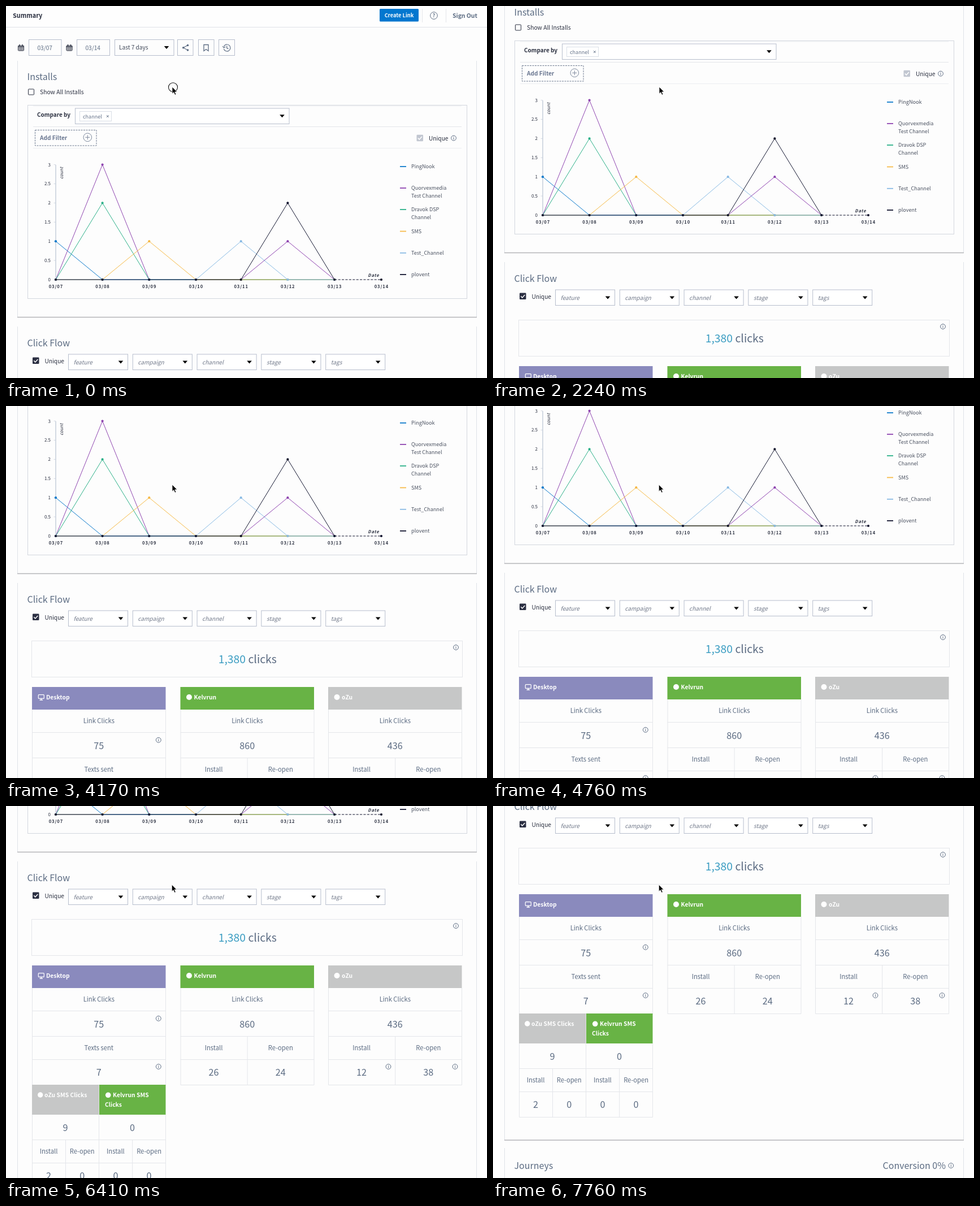
An HTML page for the animation above (8000 ms loop, 851 by 658 pixels).

```html
<!DOCTYPE html>
<html lang="en">
<head>
<meta charset="utf-8">
<title>Summary</title>
<style>
html, body { margin: 0; width: 100%; height: 100%; overflow: hidden; background: #fdfdfd; }
svg { display: block; width: 100vw; height: 100vh; font-family: "Noto Sans CJK JP", "Noto Sans CJK SC", "Noto Sans CJK", "Open Sans", sans-serif; }
text { white-space: pre; }
</style>
</head>
<body>
<svg id="stage" viewBox="0 0 851 658">
  <g id="page"></g>
  <circle id="ripple" cx="295.5" cy="143.7" r="8" fill="none" stroke="#111" stroke-width="1.1"/>
  <path id="cursor" d="M0 0V12.2L2.8 9.7 4.9 14.3 7 13.4 4.9 8.9H8.8Z" fill="#000" stroke="#fff" stroke-width=".8"/>
</svg>
<script>
const INK = '#2b3040', SLATE = '#5b6b82', EDGE = '#b7becd', HAIR = '#e4e6ea';
const VIOLET = '#8a8abd', GREEN = '#68b345', GREY = '#c6c7c7';
const $ = id => document.getElementById(id);
let out = '';
const add = s => { out += s; };

// y is the middle of the capital letters
function text(x, y, s, size, color = INK, extra = '') {
  add(`<text x="${x}" y="${(y + size * 0.366).toFixed(2)}" font-size="${size}" fill="${color}" ${extra}>${s}</text>`);
}
const MID = 'text-anchor="middle" ', END = 'text-anchor="end" ', BOLD = 'font-weight="700" ';
const LIGHT = 'font-weight="300" ', ITALIC = 'font-style="italic" ', MEDIUM = 'font-weight="500" ';

const box = (x, y, w, h, stroke = EDGE, fill = 'none', extra = '') =>
  add(`<rect x="${x}" y="${y}" width="${w}" height="${h}" stroke="${stroke}" fill="${fill}" ${extra}/>`);
const fill = (x, y, w, h, color, extra = '') => box(x, y, w, h, 'none', color, extra);
const path = (d, stroke, width = 1, extra = '') =>
  add(`<path d="${d}" fill="none" stroke="${stroke}" stroke-width="${width}" ${extra}/>`);
const line = (x1, y1, x2, y2, color = HAIR, width = 1, extra = '') =>
  path(`M${x1} ${y1}L${x2} ${y2}`, color, width, extra);
const dot = (x, y, r, color) => add(`<circle cx="${x}" cy="${y}" r="${r}" fill="${color}"/>`);
const ring = (x, y, r, color = SLATE) =>
  add(`<circle cx="${x}" cy="${y}" r="${r}" fill="none" stroke="${color}"/>`);
const caret = (x, y) => add(`<path d="M${x - 4.3} ${y - 2.4}h8.6l-4.3 5z" fill="#000"/>`);

function info(x, y) {
  ring(x, y, 4.4);
  path(`M${x} ${y - 2.4}v1.2M${x} ${y - .5}v2.9`, SLATE);
}
function check(x, y, color) {
  fill(x, y, 11.5, 11.5, color, 'rx="1.3"');
  path(`M${x + 2.3} ${y + 5.8}l2.5 2.6 4.5-5`, '#fff', 1.5);
}
function calendar(x, y) {
  box(x + .5, y + 2, 10, 9, INK, 'none', 'rx="1"');
  path(`M${x + 3} ${y}v3M${x + 8} ${y}v3M${x} ${y + 4}h11`, INK, 1.4);
  path(`M${x} ${y + 6.5}h11M${x} ${y + 9}h11M${x + 3.3} ${y + 4}v7M${x + 5.7} ${y + 4}v7M${x + 8} ${y + 4}v7`, INK, .7);
}
function panel(top, bottom) {
  path(`M20.5 ${top}V${bottom}M832.5 ${top}V${bottom}`, '#dfe2e8');
  line(20, bottom + .5, 833, bottom + .5, '#b4b5b8', 1.3);
}

function header() {
  fill(0, 0, 851, 37, '#fefefe');
  line(0, 37.5, 851, 37.5, '#dfe2e8');
  text(12, 17, 'Summary', 10.9, INK, BOLD);
  fill(661, 5, 69, 22.5, '#0277cf', 'rx="1.5"');
  text(695.5, 16.3, 'Create Link', 9.3, '#fff', BOLD + MID);
  line(736.5, 5, 736.5, 29);
  line(778.5, 5, 778.5, 29);
  ring(757, 17, 6.3);
  text(757, 17.2, '?', 8.5, SLATE, BOLD + MID);
  text(790, 17, 'Sign Out', 10.4, SLATE, BOLD);

  calendar(21, 68);
  calendar(106.5, 68);
  [[40, 58], [125, 58.5], [192, 105], [303, 28], [340, 28], [376, 28.5]]
    .forEach(([x, w]) => box(x + .5, 59.5, w - .5, 28));
  text(68.7, 74, '03/07', 10.2, SLATE, MID);
  text(153.7, 74, '03/14', 10.2, SLATE, MID);
  text(200, 73.5, 'Last 7 days', 10.1, '#3f4757');
  caret(284, 73.5);
  path('M321.5 69.5L313.5 73.8 321.5 78', SLATE, 1.1);
  [[321.5, 69.5], [313.7, 73.8], [321.5, 78]].forEach(([x, y]) => dot(x, y, 1.8, SLATE));
  path('M350 68.5h8v11l-4-3-4 3z', SLATE, 1.3);
  path('M385.5 71.5A6 6 0 1 1 385.3 76M383.3 71l2 3 3-2M390.7 70.5v3.8l2.8 1.8', SLATE, 1.2);
}

const DAY_X = [88, 170.6, 253.3, 336, 415.7, 498.4, 581.2, 664];
const SERIES = [
  ['#0f7bcb', [1, 0, 0, 0, 0, 0, 0], 284, ['PingNook']],
  ['#8f45b0', [0, 3, 0, 0, 0, 1, 0], 322, ['Quorvexmedia', 'Test Channel']],
  ['#2bb088', [0, 2, 0, 0, 0, 0, 0], 360, ['Dravok DSP', 'Channel']],
  ['#f6ba49', [0, 0, 1, 0, 0, 0, 0], 398.5, ['SMS']],
  ['#8abbe4', [0, 0, 0, 0, 1, 0, 0], 436.8, ['Test_Channel']],
  ['#12152f', [0, 0, 0, 0, 0, 2, 0], 475, ['plovent']]
];

function chart() {
  const level = v => 484 - 67.8 * v;
  line(88, 281, 88, 484, '#b9c3d2', 1.2);
  for (let v = 0; v <= 3; v += .5) {
    line(84.5, level(v), 88, level(v), '#c3cbd8', .7);
    text(79, level(v), v, 8, INK, END + MEDIUM);
  }
  DAY_X.forEach((x, i) =>
    text(x + .4, 496.5, '03/' + String(7 + i).padStart(2, '0'), 7.6, INK, BOLD + MID + 'letter-spacing=".9"'));
  text(0, 0, 'count', 7.9, INK, ITALIC + MID + MEDIUM + 'transform="translate(98 295.5) rotate(-90)"');
  text(660.5, 476, 'Date', 7.5, INK, BOLD + ITALIC + END + 'letter-spacing=".8"');
  for (const [color, values, y, label] of SERIES) {
    path('M' + values.map((v, i) => `${DAY_X[i]} ${level(v)}`).join('L'), color);
    values.forEach((v, i) => dot(DAY_X[i], level(v), 2.1, color));
    line(697, y, 708, y, color, 1.8);
    label.forEach((s, i) => text(717, y + 13.8 * i, s, 9.1, '#4b5261', LIGHT));
  }
  line(581.2, 484, 664, 484, '#12152f', 1.2, 'stroke-dasharray="4.2 2.2"');
  dot(664, 484, 2.1, '#12152f');
}

function installs() {
  panel(97, 550);
  text(37.5, 125, 'Installs', 16, SLATE, MEDIUM);
  box(39.5, 147, 10, 10, INK, '#fff', 'rx="1"');
  text(60, 152.3, 'Show All Installs', 10.3);
  box(38.5, 175.5, 777, 342, '#d3d7de');
  line(48, 177, 806, 177, '#eceef1');
  text(55, 192.3, 'Compare by', 10, INK, BOLD);
  box(122.5, 181, 378.5, 27.5, EDGE, '#fff');
  box(130.5, 186.5, 56, 17, '#d9dee6', '#fff');
  text(136, 195.2, 'channel', 9.05, '#66738a');
  path('M177.9 193.2l3.8 3.8m0-3.8l-3.8 3.8', SLATE);
  caret(488.5, 194.6);
  line(48, 213.5, 806, 213.5);
  box(51.5, 219.5, 108.5, 27.5, '#6d7a90', 'none', 'stroke-dasharray="3 1.5"');
  text(60, 233, 'Add Filter', 10.1, '#697690', BOLD);
  ring(144.3, 232.3, 7.3, '#7c889c');
  path('M140.3 232.3h8M144.3 228.3v8', '#7c889c');
  check(726.5, 227.7, '#c2c7d1');
  text(748, 234, 'Unique', 10.2);
  info(792, 233.6);
  line(48, 251.5, 806, 251.5, '#eceef1');
  chart();
}

const cell = (x, y, s, big) => text(x, y, s, big ? 16.2 : 11.2, SLATE, MID + LIGHT);

function card(x, name, color) {
  const right = x + 236.5;
  path(`M${x + .5} 791V962.5H${right}V791M${x} 831.5H${right}M${x} 876.5H${right}M${x} 917.5H${right}`, HAIR);
  fill(x, 751, 236.5, 40, color);
  text(x + (color === VIOLET ? 25 : 24), 769, name, 10.3, '#fff', BOLD);
  cell(x + 118.3, 811, 'Link Clicks');
}

function phoneCard(x, name, color, clicks, opened, reopened) {
  card(x, name, color);
  dot(x + 15.5, 769, 5, '#fff');
  cell(x + 118.3, 855, clicks, true);
  line(x + 118.7, 877, x + 118.7, 962);
  cell(x + 59, 896.7, 'Install');
  cell(x + 177.3, 896.7, 'Re-open');
  cell(x + 59, 940.3, opened, true);
  cell(x + 177.3, 940.3, reopened, true);
}

function clickFlow() {
  panel(567, 1185.5);
  text(37.5, 596, 'Click Flow', 16, SLATE, MEDIUM);
  check(47, 621.5, '#2b2f42');
  text(68.5, 628, 'Unique', 10.2);
  ['feature', 'campaign', 'channel', 'stage', 'tags'].forEach((s, i) => {
    const x = 110.5 + 113.8 * i;
    box(x, 616, 105, 27.5, EDGE, '#fff');
    text(x + 9, 630, s, 10.1, '#71798a', ITALIC + LIGHT);
    caret(x + 92.5, 630);
  });
  box(45.5, 669.5, 762, 64, HAIR);
  info(796, 681);
  text(427.3, 702, '<tspan fill="#3b9dc2">1,380</tspan> clicks', 19.4, SLATE, MID + LIGHT);

  card(46, 'Desktop', VIOLET);
  box(57.3, 764.7, 10, 6.7, '#fff', 'none', 'rx="1" stroke-width="1.2"');
  path('M59.5 774h5.6M62.3 771.5v2.5', '#fff', 1.5);
  cell(164.3, 855, '75', true);
  cell(164.3, 896.7, 'Texts sent');
  cell(164.3, 940.3, '7', true);
  info(269.8, 844.8);
  info(269.8, 930);
  phoneCard(308.5, 'Kelvrun', GREEN, '860', '26', '24');
  phoneCard(570, 'oZu', GREY, '436', '12', '38');
  info(676.5, 930);
  info(794.5, 930);

  path('M46.5 1015V1145.5H282.5V1015M164.5 1015V1145M105.5 1059.5V1145M223.7 1059.5V1145M46 1059.5H282.5M46 1100.5H282.5', HAIR);
  fill(46, 962, 118.5, 53, GREY);
  fill(165, 962, 117.5, 53, GREEN);
  dot(60.7, 980, 4.7, '#fff');
  text(68, 980.3, 'oZu SMS Clicks', 10.3, '#fff', BOLD);
  dot(180.7, 980.3, 4.8, '#fff');
  text(189, 980.3, 'Kelvrun SMS', 10.3, '#fff', BOLD);
  text(175, 997, 'Clicks', 10.3, '#fff', BOLD);
  cell(105, 1038.3, '9', true);
  cell(223.5, 1038.3, '0', true);
  ['2', '0', '0', '0'].forEach((s, i) => {
    const x = 75.5 + 59.2 * i;
    cell(x, 1080, i % 2 ? 'Re-open' : 'Install');
    cell(x, 1123.5, s, true);
  });
}

function journeys() {
  panel(1200, 1400);
  text(37.5, 1231, 'Journeys', 16, SLATE, MEDIUM);
  text(801, 1231, 'Conversion 0%', 16, SLATE, END + MEDIUM);
  info(810.3, 1231);
}

header();
installs();
clickFlow();
journeys();
$('page').innerHTML = out;

// Scroll offset by screen tick
const LOOP = 8000, TICK = 149;
const STOPS = [[0, 0], [7, 0], [15, 114], [21, 162], [22, 162], [28, 254], [30, 259], [31, 259],
  [36, 380], [39, 380], [43, 469], [46, 526], [50, 592], [51, 592], [52, 595], [54, 595]];

const slope = i => (STOPS[i + 1][1] - STOPS[i][1]) / (STOPS[i + 1][0] - STOPS[i][0]);
function tangent(i) {
  if (i < 1 || i > STOPS.length - 2) return 0;
  const a = slope(i - 1), b = slope(i);
  return a * b > 0 ? 2 * a * b / (a + b) : 0;
}
function scrollAt(k) {
  const i = Math.max(0, STOPS.findIndex(s => s[0] >= k) - 1);
  const [k0, y0] = STOPS[i], [k1, y1] = STOPS[i + 1];
  const w = k1 - k0, u = (k - k0) / w, v = 1 - u;
  return y0 * v * v * (1 + 2 * u) + y1 * u * u * (3 - 2 * u)
    + w * u * v * (tangent(i) * v - tangent(i + 1) * u);
}

function draw(ms) {
  const k = Math.floor((ms % LOOP + 10) / TICK);
  $('page').setAttribute('transform', `translate(0 ${-Math.round(scrollAt(k))})`);
  $('ripple').setAttribute('visibility', k < 1 ? 'visible' : 'hidden');
  const x = k < 32 ? 294 : 293.3, y = k < 23 ? 143 : 139;
  $('cursor').setAttribute('transform', `translate(${x} ${y})`);
}

const start = performance.now();
function loop() {
  draw(performance.now() - start);
  requestAnimationFrame(loop);
}
loop();
</script>
</body>
</html>
```
